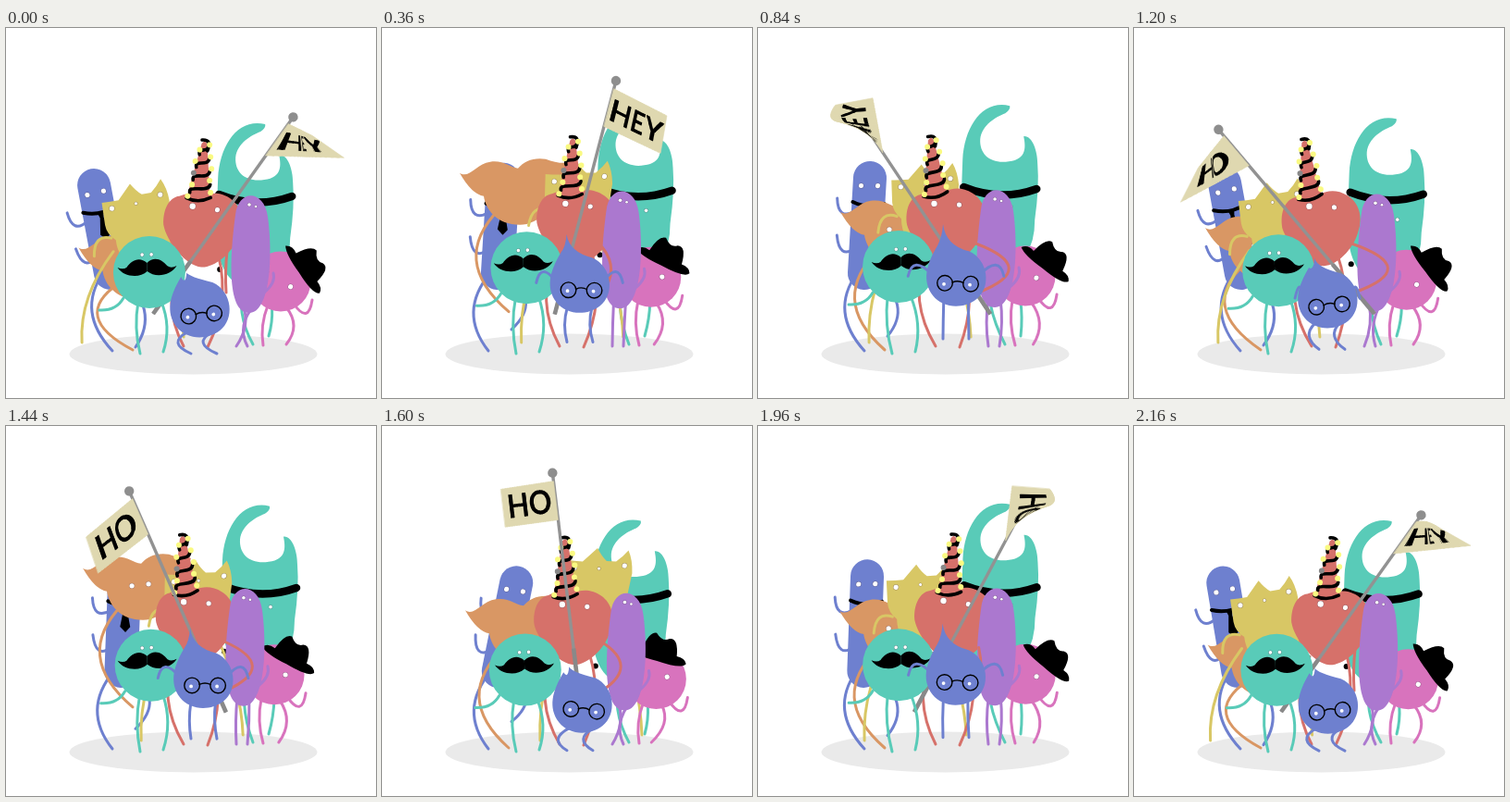
Recreate the animation shown at these times as an HTML page with a canvas. Size 400 px wide and 400 px high, loop 2200 ms.

```html
<!DOCTYPE html>
<html lang="en">
<head>
<meta charset="utf-8">
<title>Monster rally</title>
<style>
html, body { margin: 0; width: 100%; height: 100%; overflow: hidden; background: #fff; }
canvas { display: block; width: 400px; height: 400px; }
</style>
</head>
<body>
<canvas id="stage" width="400" height="400"></canvas>
<script>
const g = document.getElementById('stage').getContext('2d');
const LOOP = 2200, SWAY = LOOP / 2, HOP = LOOP / 4, STEP = 40, RAD = Math.PI / 180;
const TEAL = '#59cbb8', BLUE = '#6e80cf', ORANGE = '#d99764', YELLOW = '#d8c765',
      RED = '#d6716a', PURPLE = '#ab78cf', PINK = '#d873bd', CLOTH = '#dfd8b0', GREY = '#929292';

let now = 0;
let bob = 0;   // 1 when everybody crouches, -1 at the top of a hop
let lean = 0;  // 1 when the pole points right, -1 when it points left
const wave = (mid, size, peak, period = SWAY) =>
  mid + size * Math.cos(2 * Math.PI * (now - peak) / period);

function at(x, y, turn, draw) {
  g.save();
  g.translate(x, y);
  g.rotate(turn);
  draw();
  g.restore();
}
function fill(color, d) {
  g.fillStyle = color;
  g.fill(new Path2D(d));
}
function stroke(color, width, d) {
  g.strokeStyle = color;
  g.lineWidth = width;
  g.stroke(new Path2D(d));
}
function dot(x, y, r = 2.4, color = '#fff') {
  g.fillStyle = color;
  g.beginPath();
  g.arc(x, y, r, 0, 7);
  g.fill();
}
function eye(x, y, r = 2.6) {
  dot(x, y, r + .5, 'rgba(90,70,90,.45)');
  dot(x, y, r);
}
// Curved line whose middle is pushed sideways by bow
function limb(color, x, y, ex, ey, bow) {
  stroke(color, 3, `M${x} ${y}Q${(x + ex) / 2 + 2 * bow} ${(y + ey) / 2} ${ex} ${ey}`);
}

function horned() {
  const x = wave(-6, 7, 245), y = 2 + 10 * bob;
  limb(TEAL, 262 + x, 262 + y, 267, 342, -7);
  limb(TEAL, 286 + x, 262 + y, 284, 333, 5);
  at(x, y, 0, () => {
    fill(TEAL, 'M285 92C255 85 236 115 234 150L232 205Q232 266 272 270Q312 264 312 215Q317 180 315 155C315 140 309 124 300 125C302 135 304 150 284 152C265 155 252 145 253 128C255 112 270 104 280 100Q286 96 285 92Z');
    eye(286, 201, 1.8);
    dot(236, 249, 3, '#000');
  });
  at(x, 4 + 4 * bob, 0, () => stroke('#000', 8.5, 'M235 172Q275 188 314 174'));
}

function tall() {
  const x = wave(121, 26, 565), y = 166 + 4 * bob, bx = wave(119, 7, 458), by = 265;
  limb(BLUE, bx - 8, by, 115, 349, -17);
  limb(BLUE, bx + 10, by, 140, wave(332, 13, 0), 18);
  at(x, y, Math.atan2(x - bx, by - y), () => {
    stroke(BLUE, 3, 'M-34 24Q-32 48 -14 37M-32 64Q-28 90 -12 77');
    stroke(BLUE, 36, `M0 0V${Math.hypot(bx - x, by - y)}`);
    stroke('#000', 4, 'M-17 27Q0 34 17 27');
    fill('#000', 'M-2 30L5 30L4 36L8 54L3 60L-3 54L0 36Z');
    eye(-9, 9); eye(9, 8);
  });
}

function maned() {
  const x = wave(0, 8, 657), y = wave(48, 25, 25, HOP) - wave(0, 25, 366);
  limb(ORANGE, 128 + x, 192 + y, 137, Math.min(348, 303 + y), -30);
  at(x, y, 0, () => {
    fill(ORANGE, 'M85 153C95 160 103 143 118 141C133 139 138 147 148 148C155 140 165 136 178 138Q190 143 202 142Q198 155 190 160C190 190 170 209 150 209C125 209 113 192 111 178Q98 176 85 153Z');
    const facing = now % SWAY < 350 || now % SWAY > 750;
    if (facing) { eye(138, 172); eye(156, 170); }
  });
}

function crowned() {
  const x = wave(187, 45, 538), y = wave(193, 19, 30);
  limb(YELLOW, x - 26, y + 30, x - 60, 340, -10);
  limb(YELLOW, x + 22, y + 40, x + 50, 334, 6);
  at(x, y, wave(.14, -.12, 0), () => {
    fill(YELLOW, 'M-39-22Q-30-23-21-25L-9-43Q-2-35 4-32L14-34Q20-41 24-49Q31-40 34-26L36 25Q20 50 0 48Q-20 40-23 18Q-33 12-35 2Z');
    eye(-28, -16); eye(-2, -22, 1.5); eye(24, -32);
    stroke(YELLOW, 3, 'M-28 16Q-47 12 -46 36');
  });
}

function partyHat() {
  fill(RED, 'M-13 1L-3-60Q0-65 3-60L13 1Z');
  let coil = 'M-13 0Q0 5 13 -3';
  for (let k = 0; k < 4; k++) {
    const y = -10 - k * 14, w = 10 - k * 2;
    coil += `M${-w} ${y + 4}C${-w - 3} ${y - 5} ${w} ${y + 3} ${w + 1} ${y - 7}`;
  }
  stroke('#000', 3.6, coil + 'M4-53Q8-66-3-64');
  for (let k = 0; k < 10; k++) {
    const side = k % 2 ? 1 : -1;
    dot(side * (12 - k * .7) + k % 3, -2 - k * 6.4, 3, k === 4 ? '#888' : '#fafa82');
  }
}

function hatted() {
  const x = 207 + 5 * lean, y = 215.5 + 2 * bob;
  limb(RED, x - 22, y + 32, 192, 344, -12);
  limb(RED, x + 18, y + 30, 218, 345, 9);
  at(x, y, .015 + .055 * lean, () => {
    fill(RED, 'M-27-34C-10-42-5-36 0-37C8-40 18-42 30-34C42-26 46-10 40 5C34 25 15 41 2 41C-15 41-38 15-42-2C-44-18-38-32-27-34Z');
    eye(-12, -24, 3.2); eye(15, -22);
  });
  at(199 + 9 * lean, 183 + 2 * bob, .11 * lean, partyHat);
}

function reach() {
  limb(RED, 237 + 2 * lean, 233 + 8 * Math.max(0, lean), 238, 286, 19 - 20 * lean);
}

function slim() {
  const x = 261.5 + 3.5 * bob, y = 241 + 3 * bob;
  limb(PURPLE, x - 9, y + 55, 249, 344, 2 + 4 * bob);
  limb(PURPLE, x + 4, y + 55, 261, 344, -3 - 5 * bob);
  limb(PURPLE, x + 14, y + 42, x + 24, y + 21, 4);
  at(x, y, 0, () => {
    fill(PURPLE, 'M-17-42C-14-70 14-70 18-40C24 5 20 64-2 64C-28 64-22-5-17-42Z');
    eye(-2, -53, 1.8); eye(5, -51, 1.3);
  });
}

function bowler() {
  const x = 293 + 4 * bob, y = 271 + 3 * bob, tilt = wave(.63, .35, 0);
  limb(PINK, x - 14, y + 26, 278, 343, -3);
  limb(PINK, x + 6, y + 28, wave(297, 6, 0), 342, 8);
  stroke(PINK, 3, `M${x + 14} ${y + 24}Q${x + 30} ${y + 47} ${x + 34} ${y + 20}`);
  dot(x, y, 32.5, PINK);
  at(x, y, tilt - .57, () => { eye(12, 1); eye(-18, -3, 2); });
  at(wave(309, 11, 0), wave(256, 6, 0), tilt, () =>
    fill('#000', 'M-32 0Q-28-7-19-5Q-17-24-9-25Q0-17 6-23Q15-27 19-7Q28-8 31-2Q28 5 0 4Q-24 5-32 0Z'));
}

const grip = () => ({ x: 211 - 52 * lean, y: 310 - Math.abs(lean), angle: (39 * lean - 3.5) * RAD });

function pole() {
  const { x, y, angle } = grip();
  at(x, y, angle, () => {
    g.lineCap = 'butt';
    stroke(GREY, 3.4, 'M0 0V-260');
    stroke('#898989', 4.6, 'M0 0V-70');
    g.lineCap = 'round';
    dot(0, -261, 5.2, '#8e8e8e');
  });
}

// The cloth trails behind the pole: its free edge swings around, droops and folds
function flag() {
  const { x, y, angle } = grip();
  const onPole = r => [x + r * Math.sin(angle), y - r * Math.cos(angle)];
  const step = ([px, py], r, a) => [px + r * Math.cos(a), py + r * Math.sin(a)];
  const mix = (p, q, s) => p.map((v, i) => v + (q[i] - v) * s);

  const gust = wave(0, 1, 50, LOOP), heading = wave(-95, 130, 230, LOOP) * RAD;
  const length = wave(55, 13, 260), fold = .9 * gust ** 4;
  const edgeTurn = heading + (90 - 65 * gust ** 3) * RAD;
  const ho = now >= 1000 && now < 2000, W = 66, H = 41, N = 22;
  const upper = onPole(252), lower = onPole(210);
  const free = step(mix(upper, lower, .5), length, heading);
  const tips = [step(free, ho ? H / 2 : -H / 2, edgeTurn), step(free, ho ? -H / 2 : H / 2, edgeTurn)];
  if (ho) tips.reverse();
  // Slack cloth bulges at its upper edge
  const bulge = Math.max(0, 55 - length) * 1.4, up = heading + (ho ? 90 : -90) * RAD;
  // The free edge must stay on the side the lettering expects
  const far = ho ? [step(free, H / 2, up), step(free, -H / 2, up)].map(p => p) : tips;
  if (ho) {
    const twist = edgeTurn - heading - 90 * RAD;
    far[0] = step(free, H / 2, up + twist);
    far[1] = step(free, -H / 2, up + twist);
  }
  const point = (u, top) => {
    const s = u + fold * Math.sin(2 * Math.PI * u) / (2 * Math.PI);
    const p = mix(top ? upper : lower, far[top ? 0 : 1], s);
    return top ? step(p, bulge * 4 * s * (1 - s), up) : p;
  };
  const strips = Array.from({ length: N }, (_, k) => {
    const u = k / N, e = Math.min(1, (k + 1.3) / N);
    const [s, t] = ho ? [e, u] : [u, e];
    const quad = [point(s, true), point(t, true), point(t, false), point(s, false)];
    const path = new Path2D('M' + quad.map(p => p.join(' ')).join('L') + 'Z');
    return { quad, path, from: ho ? 1 - e : u, to: ho ? 1 - u : e };
  });
  g.fillStyle = g.strokeStyle = CLOTH;
  g.lineWidth = .6;
  for (const { path } of strips) { g.fill(path); g.stroke(path); }
  g.fillStyle = '#000';
  g.textAlign = 'center';
  g.font = `bold ${ho ? 35 : 32}px Lato, sans-serif`;
  for (const { quad: [a, b, c, d], path, from, to } of strips) {
    const ax = [0, 1].map(i => (b[i] - a[i] + c[i] - d[i]) / 2 / (to - from) / W);
    const ay = [0, 1].map(i => (d[i] - a[i] + c[i] - b[i]) / 2 / H);
    const o = [0, 1].map(i => (a[i] + b[i] + c[i] + d[i]) / 4 - ax[i] * (from + to) / 2 * W - ay[i] * H / 2);
    g.save();
    g.clip(path);
    g.transform(...ax, ...ay, ...o);
    g.fillText(ho ? 'HO' : 'HEY', W / 2, 32.5);
    g.restore();
  }
}

function moustached() {
  const x = wave(154.5, 2.5, 245), y = 261 + 3 * bob;
  limb(TEAL, x - 12, y + 32, 145, 352, -3);
  limb(TEAL, x + 13, y + 32, 170, 350, 5);
  stroke(TEAL, 3, `M${x - 28} ${y + 28}Q${x - 36} ${y + 42} ${x - 54} ${y + 41}`);
  dot(x, y, 39, TEAL);
  at(x + wave(-1, 4, 764), y - 5, -.03, () => {
    eye(-5, -14, 1.8); eye(5, -14, 1.8);
    for (const side of [1, -1]) {
      g.scale(side, 1);
      fill('#000', 'M0-5C8-13 17-8 22-1Q26 2 32-1C26 9 9 12 0 4Z');
    }
  });
}

function drop() {
  const x = wave(213, 4, 611), y = 286 + 17 * bob, tip = -48 + 9.5 * bob;
  for (const foot of [200, 228])
    limb(BLUE, x + (foot - 214) * .95, y + 26, foot, 344 + 8 * bob, -6 * (1 + bob));
  at(x, y, 0, () => {
    const hand = 40 - 12 * bob;
    for (const side of [-1, 1])
      stroke(BLUE, 3, `M${side * 26} -3Q${side * (hand - 5)} -24 ${side * hand} -1`);
    fill(BLUE, `M-14 ${tip}Q-11 -34 14 -28C36 -18 38 12 22 24C8 35 -14 34 -25 20C-37 4 -32 -14 -20 -34Q-15 ${tip + 14} -14 ${tip}Z`);
    at(2, 7, wave(0, -.12, 61), () => {
      g.strokeStyle = '#000';
      g.lineWidth = 1.4;
      for (const ex of [-14, 14]) {
        g.beginPath();
        g.arc(ex, 0, 8.3, 0, 7);
        g.stroke();
        dot(ex - 1, 1, 1.9);
      }
      stroke('#000', 1.4, 'M-6-1Q0-4 6-1');
    });
  });
}

function frame(ms) {
  now = Math.floor(ms % LOOP / STEP) * STEP;
  bob = wave(0, 1, 0, HOP);
  lean = wave(0, 1, -20, LOOP);
  g.fillStyle = '#fff';
  g.fillRect(0, 0, 400, 400);
  g.lineCap = 'round';
  g.fillStyle = '#eaeaea';
  g.beginPath();
  g.ellipse(202.5, 352.5, 134, 22, 0, 0, 7);
  g.fill();
  for (const draw of [horned, tall, maned, crowned, hatted, bowler, slim, reach, pole, flag, moustached, drop]) draw();
}
const start = performance.now();
function tick() {
  frame(performance.now() - start);
  requestAnimationFrame(tick);
}
tick();
</script>
</body>
</html>
```
